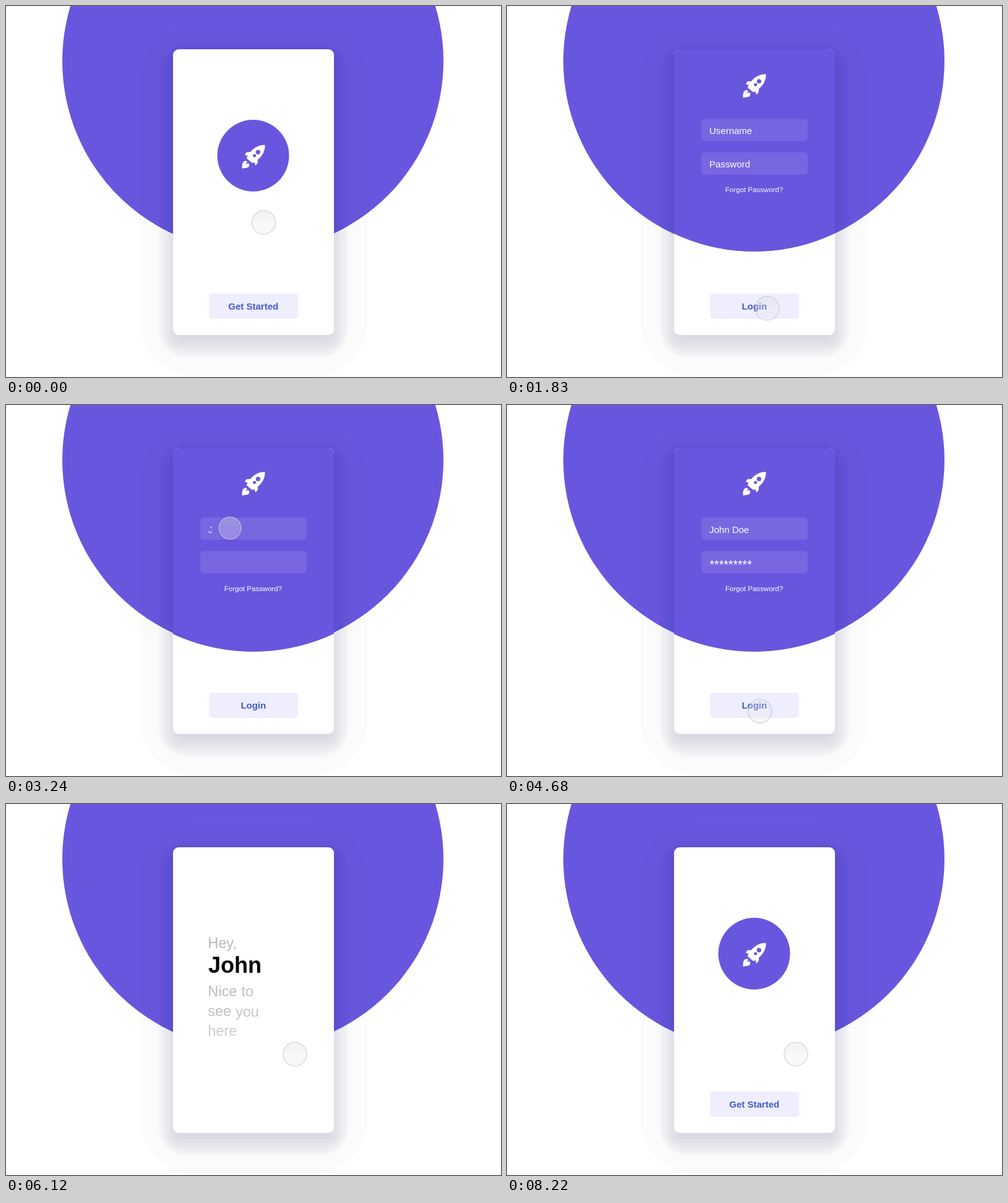
Animation of 800 by 600 pixels, one loop 8340 ms. Source, as an HTML page:

```html
<!DOCTYPE html>
<html lang="en">
<head>
<meta charset="utf-8">
<title>Login flow</title>
<style>
  html, body { margin: 0; width: 100%; height: 100%; overflow: hidden; background: #fff; }
  svg { display: block; width: 800px; height: 600px; font-family: "Liberation Sans", Arial, sans-serif; }
  .label { font-size: 15px; fill: #fff; }
  .action { font-size: 15px; font-weight: bold; fill: #4259d2; text-anchor: middle; }
  .word { font-size: 23.5px; fill: #b9b9b9; }
  .name { font-size: 36px; font-weight: bold; fill: #000; }
</style>
</head>
<body>
<svg viewBox="0 0 800 600">
  <defs>
    <clipPath id="cardClip"><rect x="270" y="70" width="260" height="462" rx="9"/></clipPath>
    <clipPath id="userClip"><rect id="userWipe" x="327" y="182" height="36"/></clipPath>
    <clipPath id="passClip"><rect id="passWipe" x="327" y="236" height="36"/></clipPath>
    <linearGradient id="glass" x2="0" y2="1">
      <stop offset=".36" stop-color="#dcdde4" stop-opacity=".34"/>
      <stop offset=".44" stop-color="#e6e6ea" stop-opacity=".28"/>
    </linearGradient>
  </defs>

  <circle cx="399" cy="89" r="308" fill="#6956de"/>
  <g id="shadow" fill="#1e1450" fill-opacity=".014"></g>
  <rect x="270" y="70" width="260" height="462" rx="9" fill="#fff"/>

  <g clip-path="url(#cardClip)">
    <g id="button">
      <rect x="328" y="465" width="144" height="41" rx="5" fill="#efeefe"/>
      <text id="start" class="action" x="399.8" y="491">Get Started</text>
      <text id="login" class="action" x="399.8" y="491">Login</text>
    </g>
    <g id="panel">
      <ellipse id="disc" cx="399.5" fill="#6956de" stroke="#5b48c6"/>
      <g id="form">
        <rect x="314" y="182" width="172" height="36" rx="6" fill="#fff" fill-opacity=".1"/>
        <rect x="314" y="236" width="172" height="36" rx="6" fill="#fff" fill-opacity=".1"/>
        <g id="hints" class="label">
          <text x="327" y="206.5">Username</text>
          <text x="327" y="261">Password</text>
        </g>
        <text class="label" x="327" y="206.5" clip-path="url(#userClip)">John Doe</text>
        <text class="label" x="327.5" y="265" style="font-size:19.5px" clip-path="url(#passClip)">*********</text>
        <text id="forgot" x="399.5" y="300.5" font-size="11.5" fill="#fff" text-anchor="middle">Forgot Password?</text>
      </g>
      <g id="rocket" fill="#fff">
        <path d="M37.5 .5C28 0 19 5 14 12L9 12C7 12.3 6 14 5 16.5L9.5 18L8 21C7.5 22.5 9 23 10 24L16 29C17 29.5 18 29.5 19 29L20.5 28.5L22 33.5C24 32 26 30 26 28L26 24C33 19 38 10 37.5 .5Z"/>
        <path d="M.8 38.8C0 35 .5 30 3 27.5C5 25.5 8 26 9 28L6 31L11 30C13 33 12 36 9.5 37C7 38 5 37.5 .8 38.8Z"/>
        <circle cx="26.3" cy="12" r="3.6" fill="#6956de"/>
        <circle cx="20.6" cy="17.6" r="2.5" fill="#6956de"/>
      </g>
    </g>
    <g id="greeting"></g>
  </g>

  <g id="cursor">
    <circle r="19" fill="url(#glass)"/>
    <circle r="18.9" fill="none" stroke="#1e1e32" stroke-opacity=".14" stroke-width="2"/>
    <circle r="17.9" fill="none" stroke="#fff" stroke-opacity=".36" stroke-width="1.4"/>
  </g>
</svg>
<script>
const LOOP = 8340;
const $ = id => document.getElementById(id);
const set = (el, attrs) => { for (const k in attrs) el.setAttribute(k, attrs[k]); };
const add = (parent, tag, attrs, text = '') => {
  const el = document.createElementNS('http://www.w3.org/2000/svg', tag);
  set(el, attrs);
  el.textContent = text;
  return parent.appendChild(el);
};
const ramp = (t, from, to) => Math.min(1, Math.max(0, (t - from) / (to - from)));
const inOut = (u, n = 3) => u < .5 ? (2 * u) ** n / 2 : 1 - (2 - 2 * u) ** n / 2;
const mix = (a, b, u) => a + (b - a) * u;

// Stepped card shadow
for (const s of [54, 24, 21, 18, 14, 10, 6, 2, -3, -8])
  add($('shadow'), 'rect', { x: 270 - s, y: 83 - s, width: 260 + 2 * s, height: 462 + 2 * s, rx: Math.max(9, 10 + 1.5 * s) });

// Greeting words: text, x, baseline, entry time
const words = [
  ['Hey,', 326.3, 233, 5620], ['John', 327, 273, 5660],
  ['Nice', 326.3, 310, 5720], ['to', 380.5, 310, 5760],
  ['see', 326.3, 340.5, 5800], ['you', 371, 340.5, 5840],
  ['here', 326.3, 371, 5880]
].map(([text, x, y, start], i) => ({
  y, start, leave: 7350 + i * 35,
  el: add($('greeting'), 'text', { x, class: text === 'John' ? 'name' : 'word' }, text)
}));

// Cursor moves: start, end, quadratic curve points
const moves = [
  [30, 480, [416.5, 350], [419, 420], [420.5, 497]],
  [690, 870, [420.5, 497], [420.5, 493], [420.5, 489]],
  [2220, 2940, [420.5, 489], [483, 360], [354, 195]],
  [3060, 3690, [354, 195], [396, 211], [462, 345]],
  [4200, 4760, [462, 345], [440, 440], [408, 496.5]],
  [5400, 6050, [408, 496.5], [455, 470], [467, 404.5]]
];

function cursorAt(t) {
  const [from, to, a, b, c] = moves.filter(m => t >= m[0]).pop() || moves[0];
  const u = inOut(ramp(t, from, to));
  return [0, 1].map(i => mix(mix(a[i], b[i], u), mix(b[i], c[i], u), u));
}

function draw(t) {
  const restart = t > 8100;
  const open = restart ? 0 : inOut(ramp(t, 1105, 1920), 2.2);
  const leave = restart ? 0 : ramp(t, 5400, 5850);
  const shown = restart ? ramp(t, 8175, 8205) : 1;

  set($('disc'), {
    cy: mix(242, 90, open),
    rx: mix(58, 308.5, open ** 1.08),
    ry: mix(58, 308.5, open),
    'stroke-opacity': .8 * open
  });
  set($('rocket'), { transform: `translate(381 ${mix(224.3, 107.7, open)})` });
  set($('panel'), {
    transform: `translate(0 ${-340 * inOut(leave, 2)})`,
    opacity: leave < 1 ? shown : 0
  });

  set($('form'), { transform: `translate(0 ${25 * (1 - open)})`, opacity: open * (1 - leave) });
  set($('forgot'), { opacity: ramp(open, .3, 1) });
  set($('hints'), { opacity: 1 - ramp(t, 3060, 3150) });
  set($('userWipe'), { width: 66 * ramp(t, 3210, 3600) });
  set($('passWipe'), { width: 72 * ramp(t, 3330, 3690) });

  const swap = restart ? 0 : ramp(t, 1110, 1290);
  set($('start'), { opacity: 1 - swap });
  set($('login'), { opacity: swap });
  set($('button'), { opacity: shown * (1 - ramp(leave, 0, .7)) });

  for (const { el, y, start, leave: out } of words) {
    const rest = (1 - ramp(t, start, start + 510)) ** 2;
    set(el, { y: y + 16 * rest, opacity: (1 - rest) * (1 - ramp(t, out, out + 480)) });
  }
  set($('cursor'), { transform: `translate(${cursorAt(t)})` });
}

function tick() {
  draw(performance.now() % LOOP);
  requestAnimationFrame(tick);
}
tick();
</script>
</body>
</html>
```
